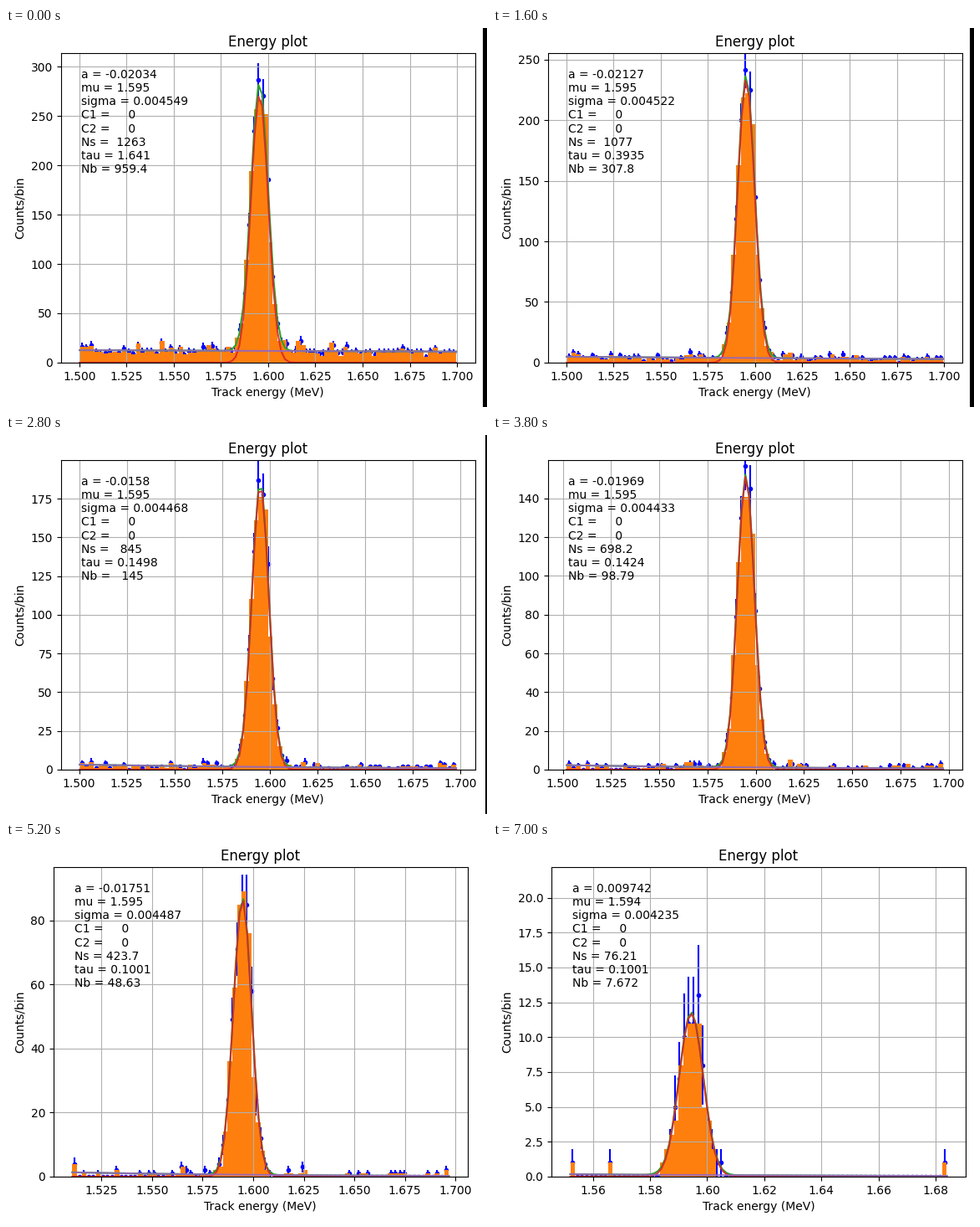
Write a matplotlib script that moves like this. It is 576 px wide and 453 px high and loops after 7.2 s.

```python
import numpy as np
import matplotlib.pyplot as plt
from matplotlib.animation import FuncAnimation
from matplotlib.patches import Rectangle

W, H, DPI = 576, 453, 100
BARS, DOTS = 80, 81

# Key fits by step: a, sigma, Ns, tau, Nb, top of the count axis.
FITS = {
    0: (-0.02034, 0.004549, 1263, 1.641, 959.4, 313.7),
    7: (-0.02127, 0.004522, 1077, 0.3935, 307.8, 255.3),
    13: (-0.0158, 0.004468, 845, 0.1498, 145, 199.8),
    18: (-0.01969, 0.004433, 698.2, 0.1424, 98.79, 159.7),
    25: (-0.01751, 0.004487, 423.7, 0.1001, 48.63, 96.6),
    30: (-0.07708, 0.004259, 197.2, 0.1001, 19.77, 53.16),
    34: (0.009742, 0.004235, 76.21, 0.1001, 7.672, 22.18),
}
# Lowest and highest energy left, held until the next listed step.
SPANS = {
    0: (1.50018, 1.69952),
    13: (1.50024, 1.6978),
    17: (1.50197, 1.69717),
    25: (1.51057, 1.69667),
    30: (1.51038, 1.684),
    33: (1.5521, 1.6839),
}
EDGES = {0: 571, 13: 574, 17: 576}

rng = np.random.default_rng(8)
jitter = {n: 0.25 * rng.standard_normal(n) for n in (BARS, DOTS)}

# Background events, longest-lived first: the late ones lean to low energy.
rank = np.arange(960)
skew = 1 + 0.6 * np.exp(-rank / 80)
events = 1.5002 + 0.1992 * ((rank * 0.618034 + 0.3 * rng.random(960)) % 1) ** skew
events[3::70] = 1.5688 + 0.0015 * rng.standard_normal(events[3::70].size)
events[25::110] = 1.6172 + 0.001 * rng.standard_normal(events[25::110].size)


def held(table, step):
    return table[max(s for s in table if s <= step)]


def fit(step):
    columns = np.array(list(FITS.values())).T
    keys = list(FITS)
    a, sigma = (np.interp(step, keys, c) for c in columns[:2])
    ns, top = (np.interp(step, keys, columns[i]) for i in (2, 5))
    tau, nb = (np.exp(np.interp(step, keys, np.log(columns[i])))
               for i in (3, 4))
    mu = 1.59545 - 3e-5 * step
    return a, mu, sigma, ns, tau, nb, top


def gauss(z):
    return np.exp(-0.5 * z ** 2)


def signal(x, step):
    lo, hi = held(SPANS, step)
    _, mu, sigma, ns, *_ = fit(step)
    height = ns * (hi - lo) / DOTS / (sigma * np.sqrt(2 * np.pi))
    return height * gauss((x - mu) / sigma)


def background(x, step):
    lo, hi = held(SPANS, step)
    *_, tau, nb, _ = fit(step)
    norm = tau * (1 - np.exp(-(hi - lo) / tau))
    return nb * (hi - lo) / DOTS * np.exp(-(x - lo) / tau) / norm


def histogram(step, n):
    """Bin centers and counts, with a shoulder and a dip right of the peak."""
    lo, hi = held(SPANS, step)
    _, mu, sigma, *_, nb, _ = fit(step)
    x = lo + (np.arange(n) + 0.5) * (hi - lo) / n
    z = (x - mu) / sigma
    peak = signal(x, step) * (1 + 0.14 * gauss((z - 0.7) / 0.2)
                              - 0.2 * gauss((z - 1.35) / 0.22))
    peak = np.round(peak + jitter[n] * np.sqrt(peak))
    left = [lo, 1.5663, hi, *events[:max(0, int(nb) - 8)]]
    rest, _ = np.histogram(left, bins=n, range=(lo, hi))
    return x, peak + rest


def label(step):
    a, mu, sigma, ns, tau, nb, _ = fit(step)
    rows = {"a": a, "mu": mu, "sigma": sigma, "C1": 0, "C2": 0,
            "Ns": ns, "tau": tau, "Nb": nb}
    return "\n".join(f"{name} = {value:5.4g}" for name, value in rows.items())


fig = plt.figure(figsize=(W / DPI + 1e-9, H / DPI + 1e-9), dpi=DPI,
                 facecolor="white")
ax = fig.add_axes([0.1, 0.1, 0.8, 0.8])
side = fig.add_artist(Rectangle((EDGES[0], 0), W, H, color="black", lw=0,
                                transform=None))


def draw(frame):
    step = max(0, frame - 1)
    lo, hi = held(SPANS, step)
    top = fit(step)[-1]

    # The margin follows the width of the count labels.
    ax.clear()
    left = 65.6 if top > 100 else 56.8 if top > 22.5 else 70
    ax.set_position([left / W, 53.12 / H, 496 / W, 369.6 / H])

    x, dots = histogram(step, DOTS)
    ax.errorbar(x, dots, yerr=np.sqrt(dots), fmt="b.", zorder=0.9)
    x, bars = histogram(step, BARS)
    ax.bar(x, bars, width=(hi - lo) / BARS, color="C1")

    x = np.linspace(lo, hi, 100)
    peak, floor = signal(x, step), background(x, step)
    ax.plot(x, peak + floor, color="C2")
    ax.plot(x, peak, color="C3", alpha=0.9)
    ax.plot(x, floor, color="C4", alpha=0.9)

    pad = 0.05 * (hi - lo)
    ax.set_xlim(lo - pad, hi + pad)
    ax.set_ylim(0, top)
    ax.grid(True)
    ax.set_title("Energy plot")
    ax.set_xlabel("Track energy (MeV)")
    ax.set_ylabel("Counts/bin")
    ax.text(0.05, 0.95, label(step), transform=ax.transAxes, va="top")
    side.set_x(held(EDGES, step))
    return []


anim = FuncAnimation(fig, draw, frames=36, interval=200, repeat=True,
                     repeat_delay=0, init_func=lambda: draw(0), blit=False)
plt.show()
```
